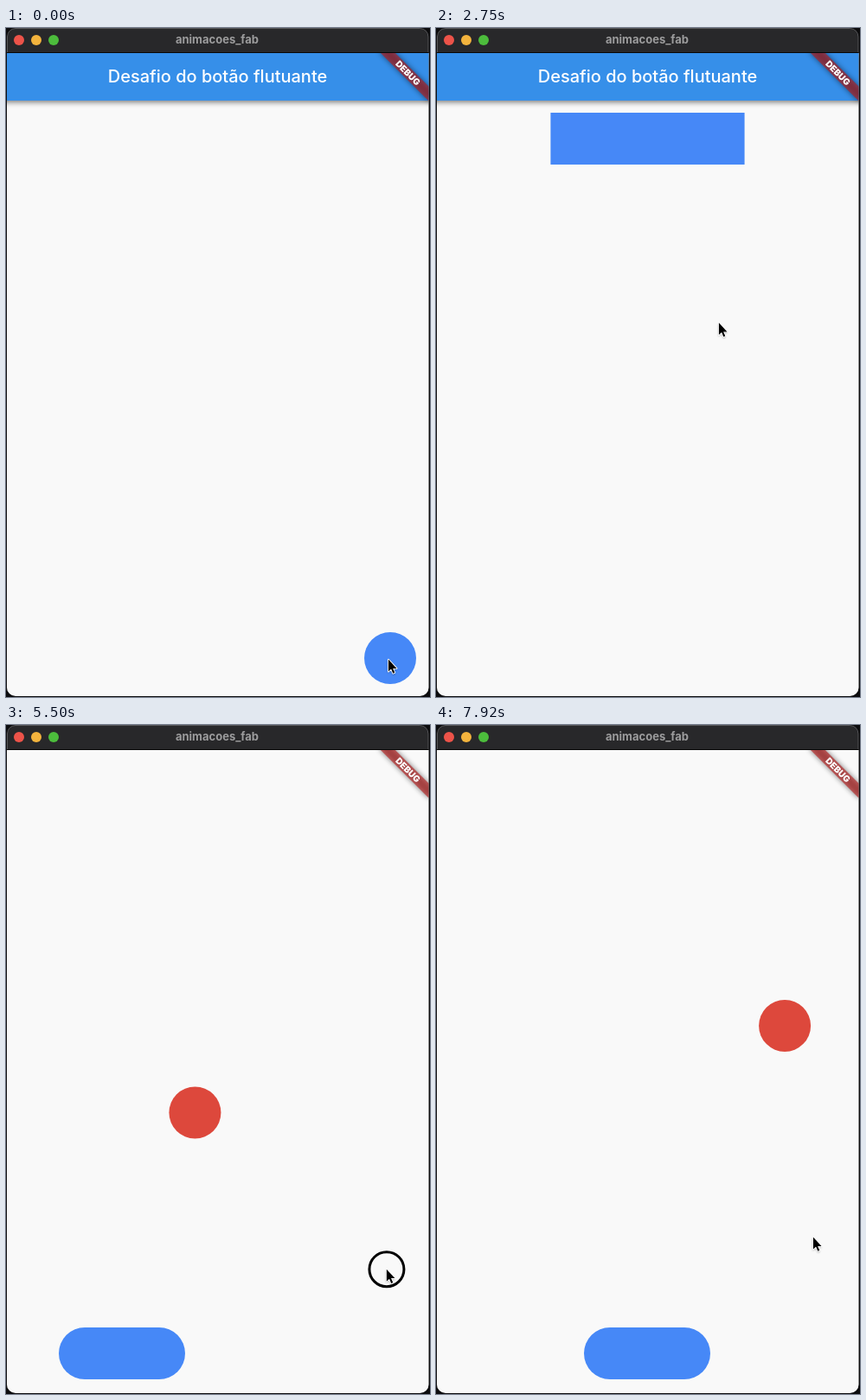
An HTML page for the animation above (8 s loop, 490 by 774 pixels).

```html
<!DOCTYPE html>
<html lang="pt">
<head>
<meta charset="utf-8">
<title>animacoes_fab</title>
<style>
  html, body { margin: 0; width: 100%; height: 100%; overflow: hidden; background: #0c0c0e; }
  svg { display: block; width: 490px; height: 774px; }
  text { font-family: Inter, Roboto, "Open Sans", sans-serif; text-anchor: middle; }
</style>
</head>
<body>
<svg viewBox="0 0 490 774" xmlns="http://www.w3.org/2000/svg">
  <defs>
    <clipPath id="window"><rect x="1" y="0" width="487.5" height="773" rx="10"/></clipPath>
    <clipPath id="content"><path d="M1 29H488.5V763a10 10 0 0 1-10 10H11a10 10 0 0 1-10-10Z"/></clipPath>
    <filter id="soft" x="-20%" y="-100%" width="140%" height="300%"><feGaussianBlur stdDeviation="3"/></filter>
    <filter id="tiny" x="-50%" y="-50%" width="200%" height="200%"><feGaussianBlur stdDeviation="1"/></filter>
  </defs>

  <rect width="490" height="774" fill="#0c0c0e"/>
  <g clip-path="url(#window)">
    <rect width="490" height="29" fill="#28282a"/>
    <rect x="1.5" y="0.5" width="486.5" height="790" rx="9.5" fill="none" stroke="#58585a"/>
    <rect y="28" width="490" height="1" fill="#080808"/>
  </g>
  <circle cx="15" cy="14" r="6" fill="#ed5349"/>
  <circle cx="35" cy="14" r="6" fill="#f3b33d"/>
  <circle cx="55" cy="14" r="6" fill="#4cbc3c"/>
  <text x="244" y="18" font-size="13" font-weight="700" fill="#9c9c9d">animacoes_fab</text>

  <g clip-path="url(#content)">
    <rect y="29" width="490" height="745" fill="#f9f9f9"/>
    <g id="home">
      <rect x="-10" y="31" width="510" height="55" fill="#000" opacity=".5" filter="url(#soft)"/>
      <rect y="29" width="490" height="55" fill="#368fe9"/>
      <text x="244.5" y="63" font-size="20" font-weight="500" fill="#fff">Desafio do botão flutuante</text>
      <rect id="fab" height="60" fill="#4688f7"/>
    </g>
    <g id="game">
      <rect id="paddle" y="697" width="146" height="60" rx="30" fill="#4688f7"/>
      <circle id="ball" r="30" fill="#dd483c"/>
    </g>
    <g transform="translate(488.5 28) rotate(45)">
      <rect x="-40" y="28" width="80" height="12" fill="#000" opacity=".5" filter="url(#soft)"/>
      <rect x="-40" y="28" width="80" height="12" fill="#b71c1c" fill-opacity=".627"/>
      <text x="0" y="37.6" font-size="10.2" font-weight="900" fill="#fff">DEBUG</text>
    </g>
  </g>

  <g id="pointer">
    <circle id="ring" cx="0.5" cy="0.5" r="20" fill="none" stroke="#000" stroke-width="3"/>
    <path d="M0 1.5V16.5L3.4 13.3 5.8 18.6 8.2 17.5 6 12.5H10.5Z" fill="#000" opacity=".35" filter="url(#tiny)"/>
    <path d="M0.4 0.6V14.6L3.6 11.6 5.8 16.7 7.8 15.8 5.6 10.9H10Z" fill="#000" stroke="#fff" stroke-width="1.8" stroke-linejoin="round" paint-order="stroke"/>
  </g>
</svg>
<script>
const LOOP = 8000, FPS = 12;
const GAME_START = 4655, PRESS = 4580, RELEASE = 6400;
const el = id => document.getElementById(id);
const home = el('home'), game = el('game'), fab = el('fab'), paddle = el('paddle');
const ball = el('ball'), pointer = el('pointer'), ring = el('ring');

const clamp01 = v => Math.min(1, Math.max(0, v));
const mix = (a, b, p) => a + (b - a) * p;
const span = (t, start, length) => clamp01((t - start) / length);
const smooth = p => p * p * (3 - 2 * p);
const linear = p => p;
const show = (node, on) => node.setAttribute('visibility', on ? 'visible' : 'hidden');

function set(node, attrs) {
  for (const key in attrs) node.setAttribute(key, attrs[key]);
}

// Waypoints are [time, x, y]
const ballPath = [
  [4655, 458, 688], [4920, 383, 613], [6083, 53, 283], [6157, 32, 262],
  [6860, 232, 62], [6917, 248, 78], [7704, 460.5, 290.5], [7917, 403, 348]
];
const pointerPath = [
  [1750, 441.5, 730], [2600, 326.5, 340.5], [2900, 326.5, 340.5], [3550, 453.5, 725.5],
  [5000, 453.5, 725.5], [5750, 434.5, 595.5], [7000, 434.5, 595.5], [7350, 435.5, 592]
];

function along(path, t, ease) {
  if (t <= path[0][0]) return path[0].slice(1);
  for (let i = 1; i < path.length; i++) {
    const [t0, x0, y0] = path[i - 1], [t1, x1, y1] = path[i];
    if (t <= t1) {
      const p = ease((t - t0) / (t1 - t0));
      return [mix(x0, x1, p), mix(y0, y1, p)];
    }
  }
  return path[path.length - 1].slice(1);
}

function drawFab(t) {
  const back = span(t, 3318, 500);
  const lift = span(t, 815, 500) - back;
  const grow = span(t, 2318, 500) - back;
  // The shape flips from circle to rectangle halfway through
  const round = grow < 0.5;
  const width = round ? 60 : mix(60, 250, grow);
  const x = mix(444, 244.5, lift), y = mix(729, 128, lift);
  set(fab, { x: x - width / 2, y: y - 30, width, rx: round ? 30 : 0 });
}

function drawGame(t) {
  const [cx, cy] = along(ballPath, t, linear);
  set(ball, { cx, cy });
  const steps = Math.round(6 * span(t, 6350, 500)) + Math.round(5 * span(t, 7480, 420));
  set(paddle, { x: 61 + 10 * steps });
}

function draw(time) {
  const t = Math.floor((time + 4) * FPS / 1000) * 1000 / FPS;
  const playing = t >= GAME_START;
  show(home, !playing);
  show(game, playing);
  show(ring, t >= PRESS && t < RELEASE);
  drawFab(t);
  drawGame(t);
  set(pointer, { transform: `translate(${along(pointerPath, t, smooth)})` });
}

const begin = performance.now();
function tick() {
  draw((performance.now() - begin) % LOOP);
  requestAnimationFrame(tick);
}
tick();
</script>
</body>
</html>
```
